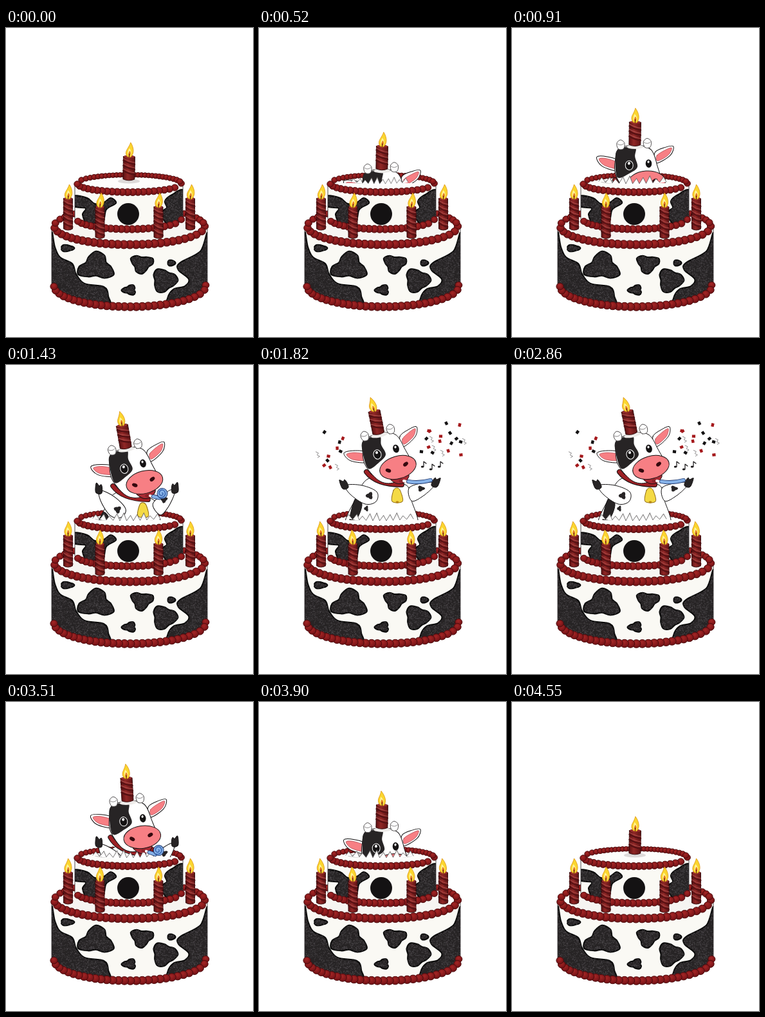
Write an HTML page that moves like this. It is 384 px wide and 480 px high and loops after 4.68 s.

```html
<!DOCTYPE html>
<html lang="en">
<head>
<meta charset="utf-8">
<title>Birthday cake</title>
<style>
html, body { margin: 0; width: 100%; height: 100%; overflow: hidden; background: #fff; }
svg { display: block; width: 100vw; height: 100vh; }
</style>
</head>
<body>
<svg id="stage" viewBox="0 0 384 480"></svg>
<script>
const STEP = 130, STEPS = 36;
const INK = '#141213', HIDE = '#272425', CREAM = '#faf9f4', PINK = '#f77f84';
const { PI, sin, cos, hypot } = Math;

let seed = 7;
const rnd = (lo = 0, hi = 1) => {
  seed = (seed * 16807) % 2147483647;
  return lo + (hi - lo) * seed / 2147483647;
};
const n1 = v => +v.toFixed(1);
const repeat = (n, f) => Array.from({ length: n }, (_, i) => f(i)).join('');

// Smooth closed curve through points
function curve(p) {
  const n = p.length, at = i => p[(i + n) % n];
  const ctrl = (b, from, to) => `${n1(b[0] + (to[0] - from[0]) / 6)} ${n1(b[1] + (to[1] - from[1]) / 6)} `;
  return `M${p[0]}` + repeat(n, i => {
    const [a, b, c, e] = [at(i - 1), at(i), at(i + 1), at(i + 2)];
    return `C${ctrl(b, a, c)}${ctrl(c, e, b)}${n1(c[0])} ${n1(c[1])}`;
  }) + 'Z';
}
const blob = list => curve(list.split(' ').map(s => s.split(',').map(Number)));

// Three-lobed hide spot
const spot = (x, y, rx, ry, turn, depth = .25) =>
  curve(Array.from({ length: 12 }, (_, i) => {
    const a = i * PI / 6, r = 1 + depth * cos(3 * (a - turn));
    return [x + rx * r * cos(a), y + ry * r * sin(a)];
  }));

const path = (d, fill, stroke = 'none', w = 1) =>
  `<path d="${d}" fill="${fill}" stroke="${stroke}" stroke-width="${w}" stroke-linejoin="round" stroke-linecap="round"/>`;
const line = (d, color, w = 1) => path(d, 'none', color, w);
const shape = (pts, fill, stroke = INK, w = 1) => path(blob(pts), fill, stroke, w);
const oval = (x, y, rx, ry, fill, turn = 0, stroke = 'none') =>
  `<ellipse cx="${n1(x)}" cy="${n1(y)}" rx="${n1(rx)}" ry="${n1(ry)}" fill="${fill}" stroke="${stroke}" transform="rotate(${turn} ${n1(x)} ${n1(y)})"/>`;

// Piped frosting, evenly spaced along an ellipse and larger towards the front
function piping(cx, cy, rx, ry, r, from = 0, to = 2 * PI) {
  let s = '';
  for (let a = from; a < to;) {
    const size = r * (.84 + .16 * sin(a));
    s += oval(cx + rx * cos(a), cy + ry * sin(a), size, size * .95, 'url(#frost)', 0, '#4e0b0d');
    a += 1.4 * size / hypot(rx * sin(a), ry * cos(a));
  }
  return s;
}

// Tier wall: straight sides, elliptical bottom
const wall = (l, r, top, bottom, ry) =>
  `M${l} ${top}V${bottom}A${(r - l) / 2} ${ry} 0 0 0 ${r} ${bottom}V${top}Z`;

const hide = (id, edge, d, grains) => {
  const dots = repeat(grains, () => `M${n1(rnd(70, 315))} ${n1(rnd(250, 434))}h.5`);
  return path(edge, CREAM, '#2a2526', .8) +
    `<clipPath id="${id}Wall"><path d="${edge}"/></clipPath><clipPath id="${id}Hide"><path d="${d}"/></clipPath>` +
    `<g clip-path="url(#${id}Wall)">${path(d, HIDE, '#080808', 2)}` +
    `<g clip-path="url(#${id}Hide)">${line(dots, '#5a5759', .6)}</g></g>`;
};

const flame = '<g class="flame">' +
  path('M0 1C-6 0-7-7-4-12C-2-16-1-18 0-22C4-17 7-9 5-4C4 0 2 1 0 1Z', '#fbd62f', '#dd9414', .8) +
  path('M0-1C-4-3-3-9-1-13C3-9 4-3 0-1Z', '#fff39a') +
  path('M0-1C-3-3-1-7 0-9C3-6 2-2 0-1Z', '#e2791c') + line('M0 1V-4', '#5a1c08', 1.2) + '</g>';

// Candle standing with its base at (x, y)
function candle(x, y, w = 14, h = 48, turn = 0) {
  const r = w / 2, stripes = off => repeat(Math.floor((h - 8) / 8), i => {
    const top = 3 + off + 8 * i - h;
    return `M${-r} ${top}Q0 ${top + 5} ${r} ${top + 6}`;
  });
  return `<g transform="translate(${x} ${y}) rotate(${turn})">` +
    path(`M${-r} ${-h}V-1Q0 3 ${r} -1V${-h}Q0 ${-h - 4} ${-r} ${-h}Z`, 'url(#wax)', '#2c0608', .9) +
    line(stripes(3), '#521013', 2) + line(stripes(0), '#b0524f', 1) +
    oval(0, -h, r - .5, 2, '#9a302f') + `<g transform="translate(0 ${-h})">${flame}</g></g>`;
}

const lowSpots =
  blob('71,321 76,340 84,356 103,366 109,382 122,397 152,402 159,416 156,436 71,425') +
  blob('314,321 302,347 270,365 268,376 284,390 278,401 260,406 251,420 253,436 314,425') +
  spot(95, 342, 10, 5, 0, .15) + spot(140, 371, 25, 19, .6, .28) + spot(211, 366, 16, 13, 1.7) +
  spot(257, 365, 6, 4.5, 0, .1) + spot(246, 392, 18, 17, 2, .2) + spot(192, 407, 10, 7, 1);
const highSpots =
  blob('106,261 126,264 138,273 152,271 163,264 171,272 156,282 150,302 128,306 119,290 124,280 106,277') +
  blob('277,254 258,259 247,269 250,279 243,286 250,304 277,306');

// Broken frosting in front of the hole
function shards() {
  const n = 10, l = 135, w = 105 / n;
  const teeth = repeat(n, i => {
    const x = l + w * i, tip = rnd(.35, .65) * w, base = 239 + 3 * sin(PI * (i + 1) / n);
    return `L${n1(x + tip)} ${n1(rnd(229, 235))}L${n1(x + w)} ${n1(base)}`;
  });
  return path(`M${l} 238${teeth}Q188 250 ${l} 238Z`, 'url(#chip)') + line(`M${l} 238${teeth}`, '#555253', .8);
}

const cake =
  hide('low', wall(71, 313, 310, 402, 31), lowSpots, 9000) +
  piping(192.5, 401, 118, 32, 6.6, -.05, PI + .05) +
  oval(192, 310, 118, 30, '#fff') + oval(192, 311, 102, 24, '#f6f4f1') +
  piping(192, 308, 117, 28.5, 6.8) +
  hide('high', wall(107, 275, 242, 296, 17), highSpots, 9000) +
  `<circle cx="190" cy="289" r="17" fill="${INK}"/>` +
  piping(191, 296, 82, 16.5, 6, .1, PI - .1) +
  oval(191.5, 242, 82, 15, '#fdfdfb') + oval(191, 238, 17, 3.6, '#dddad9') +
  piping(191.5, 241.5, 81, 13.5, 5.8);

const body =
  shape('174,176 152,205 138,260 241,260 236,208 226,186', '#fff') +
  shape('150,208 160,217 153,238 141,241', HIDE) + path(spot(167, 224, 3, 4, 1), HIDE);
const hoof = (x, y, side) => `<g transform="translate(${x} ${y}) scale(${side} 1)">` +
  shape('-8,-6 -2,-4 0,-7 4,-2 6,5 1,8 -4,6', HIDE) + '</g>';
const leftArm = shape('135,188 160,188 183,198 182,213 165,217 142,202', '#fff') +
  path(spot(172, 204, 5, 5, 1), HIDE) + hoof(133, 186, 1);
const rightArm = shape('234,191 266,183 271,190 253,206 237,212', '#fff') +
  path(spot(252, 193, 5, 4, 2), HIDE) + hoof(274, 183, -1);

const nub = (x, y) => `<g transform="translate(${x} ${y}) rotate(-15)">` +
  shape('-4,8 -6,-1 0,-6 6,-1 4,8', '#fff', '#4a4748', .9) + line('M-5 0Q0 4 5 0', '#777475', .8) + '</g>';
const nostril = (x, y, turn) => oval(x, y, 4.4, 2.8, '#35090e', turn);
const head =
  line('M167 167Q182 187 222 187', INK, 8) + line('M167 167Q182 187 222 187', '#9c2024', 6) +
  shape('209,196 215,192 220,197 223,213 207,213', '#f4da45', '#8a6410') + oval(215, 214, 2.5, 1.8, '#b98817') +
  shape('169,137 148,134 132,138 143,150 169,152', '#fff') +
  shape('166,140 148,137 136,140 146,148 167,149', PINK, '#a03640', .6) +
  shape('219,112 233,101 245,97 243,112 224,128', '#fff') +
  shape('223,116 234,105 243,100 240,112 226,124', PINK, '#a03640', .6) +
  shape('163,118 188,107 212,109 226,130 238,160 214,182 189,182 166,158 161,135', '#fff') +
  shape('163,118 187,111 190,125 197,140 187,152 170,162 161,135', HIDE, 'none') +
  oval(184, 140, 6, 7.2, INK, -15, '#fff') + oval(183, 137, 2, 2.3, '#fff') +
  oval(213, 131, 4.8, 6.4, INK, -15) + oval(212, 128.5, 1.6, 2, '#fff') +
  shape('204,176 232,171 227,183 214,185', '#a92b34') +
  oval(216, 160, 29, 17.5, PINK, -16, INK) + nostril(201, 165, 20) + nostril(228, 155, -40) +
  oval(187, 110, 13, 3.5, '#eeecea', -12) + nub(164, 110) + nub(204, 99);

const mouthpiece = line('M220 181L234 182', '#8c2228', 5) + line('M225 181L229 182', '#fff', 4);
const tube = d => line(d, '#223a70', 6) + line(d, '#86b2e8', 4.4);
const curled = mouthpiece + tube('M230 182L240 184') + oval(244, 177, 8, 8, '#86b2e8', 0, '#223a70') +
  line('M239 183C247 185 251 178 247 173C243 169 237 174 240 179C243 182 247 178 244 176', '#3763ae', 1.4);
const open = mouthpiece + tube('M232 182Q248 185 267 180');

// Confetti scattered left and right of the cow; the first few pieces are notes
const bits = Array.from({ length: 34 }, (_, i) =>
  i < 3 ? [256 + 13 * i, 155 + 4 * (i % 2)] :
  i % 3 ? [rnd(248, 320), rnd(90, 145)] : [rnd(87, 138), rnd(104, 170)]);
function bit(_, i) {
  const color = i % 2 ? '#a5191c' : INK;
  const art = i < 3 ? oval(-2, 3, 2.2, 1.6, INK) + line('M0 3V-5L4-2', INK, 1.2) :
    i % 5 === 0 ? line('M-3-4L1-2L-1 1L3 3L0 5', '#8e8c8d') :
    `<rect x="-2.6" y="-2.2" width="5.2" height="4.4" fill="${color}" transform="rotate(${i * 47})"/>`;
  return `<g>${art}</g>`;
}

const stage = document.getElementById('stage');
stage.innerHTML = `<defs>
<radialGradient id="frost" cx=".45" cy=".35" r=".75"><stop offset="0" stop-color="#a42625"/><stop offset=".6" stop-color="#82171a"/><stop offset="1" stop-color="#5f0f11"/></radialGradient>
<linearGradient id="wax"><stop offset="0" stop-color="#5b1113"/><stop offset=".4" stop-color="#902726"/><stop offset="1" stop-color="#601415"/></linearGradient>
<linearGradient id="chip" x2="0" y2="1"><stop offset="0" stop-color="#dedcda"/><stop offset=".6" stop-color="#fff"/></linearGradient>
<clipPath id="above"><path d="M0 0H384V241H0Z"/></clipPath></defs>
${cake}
<g id="hole">${oval(188, 239, 50, 4, '#c9c7c6')}</g>
<g clip-path="url(#above)">
<g id="body">${body}<g id="left">${leftArm}</g><g id="right">${rightArm}</g></g>
<g id="cow"><g id="head">${head}</g>${candle(186, 108, 18, 36, -11)}</g>
</g>
<g id="shards">${shards()}</g>
<g id="horn"><g id="curled">${curled}</g><g id="open">${open}</g></g>
${candle(96.5, 313)}${candle(286.5, 313)}${candle(146, 326)}${candle(237, 326)}
<g id="party">${bits.map(bit).join('')}</g>`;

const part = {};
for (const g of stage.querySelectorAll('g[id]')) part[g.id] = g;
const flames = stage.querySelectorAll('.flame');
const move = (node, t) => node.setAttribute('transform', t);
const show = (node, on) => node.setAttribute('display', on ? 'inline' : 'none');
const ease = (k, from, to) => {
  const u = Math.min(1, Math.max(0, (k - from) / (to - from)));
  return u * u * (3 - 2 * u);
};

// k counts steps from the whole cake (0) to the full party (18)
function pose(k) {
  const dy = 129 - 131 * ease(k, 1, 14.7);
  const tilt = 12 * (1 - ease(k, 7, 12));
  const arm = 24 * (1 - ease(k, 11, 14));
  const crack = ease(k, 1, 5);
  const spread = .035 * (k - 14);

  const at = `translate(${-tilt / 6} ${dy}) rotate(${tilt} 195 140)`;
  move(part.cow, at);
  move(part.horn, at);
  move(part.body, `translate(0 ${dy})`);
  move(part.left, `rotate(${arm} 175 207)`);
  move(part.right, `rotate(${-arm} 237 205)`);
  for (const g of [part.hole, part.shards]) {
    move(g, `translate(188 243) scale(${crack}) translate(-188 -243)`);
    show(g, crack > 0);
  }
  show(part.head, crack > .4);
  show(part.body, k > 7);
  show(part.horn, k > 8);
  show(part.curled, k < 12);
  show(part.open, k >= 12);
  flames.forEach(f => move(f, `skewX(${-5 * cos(k * PI / 2)})`));

  show(part.party, k >= 12);
  bits.forEach(([x, y], i) => {
    const wide = 1 + spread * (x < 192 ? 1.8 : 1);
    move(part.party.children[i], `translate(${192 + (x - 192) * wide} ${150 + (y - 150) * (1 + spread)})`);
  });
}

// The cow rises and then sinks back the same way
function tick() {
  const i = Math.floor(performance.now() / STEP) % STEPS;
  pose(Math.min(i, STEPS - i));
  requestAnimationFrame(tick);
}
tick();
</script>
</body>
</html>
```
